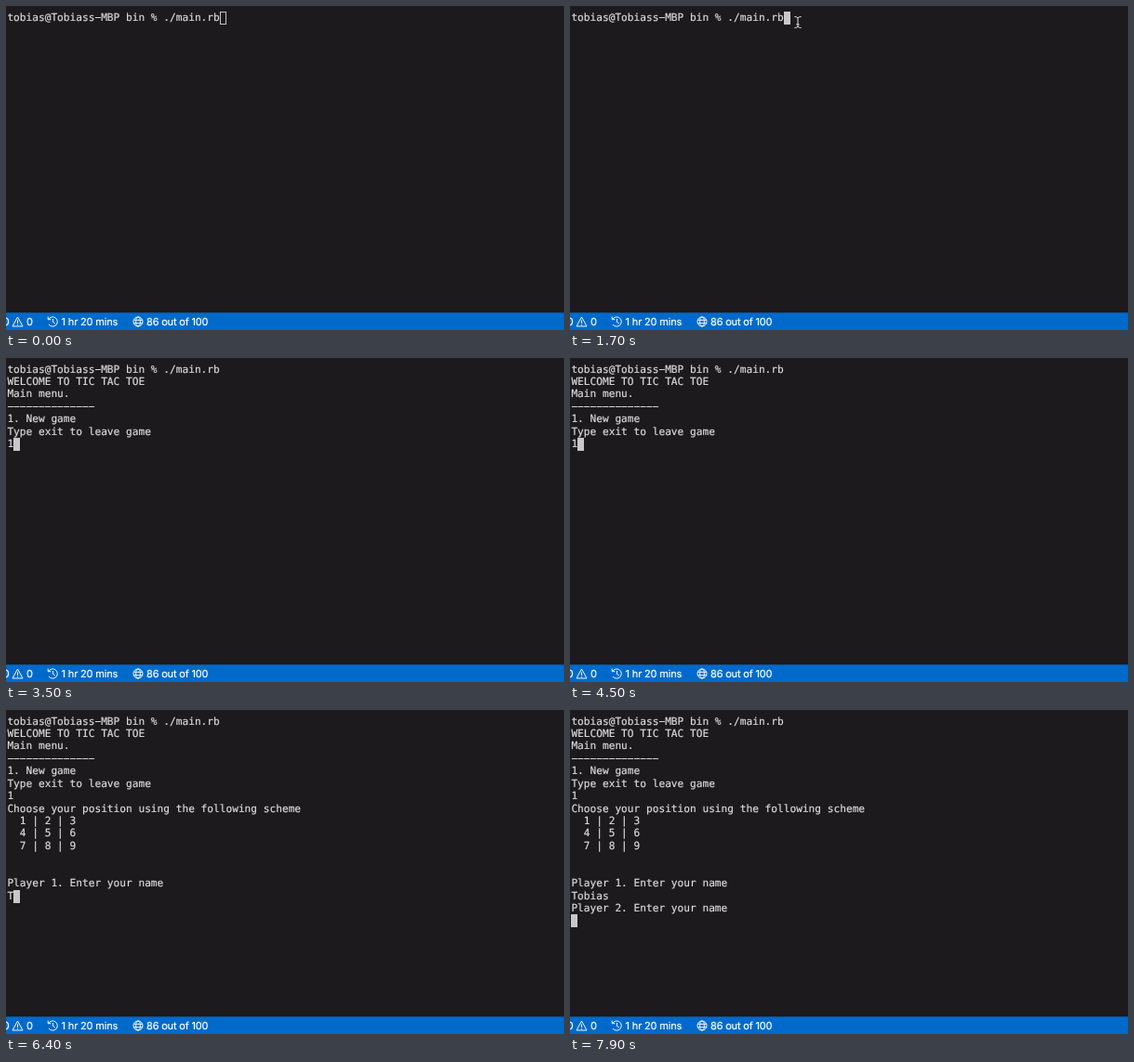
Recreate the animation shown at these times as an HTML page. Size 600 by 349 pixels, loop 8000 ms.

```html
<!DOCTYPE html>
<html lang="en">
<head>
<meta charset="utf-8">
<title>Tic tac toe in the terminal</title>
<style>
  html, body { margin: 0; width: 100%; height: 100%; overflow: hidden; background: #1c1a1c; }
  svg { display: block; width: 600px; height: 349px; }
  text { white-space: pre; text-rendering: geometricPrecision; stroke-width: 0.2; }
  #screen { font: 11.17px "DejaVu Sans Mono", monospace; fill: #dcdadc; stroke: #dcdadc; }
  #cursor { fill: #c9c7c9; stroke: #c9c7c9; stroke-width: 1; }
  #cursor.hollow { fill: none; }
  #pointer { fill: none; stroke: #e2e2e2; stroke-width: 1; }
  #status { font: 11px Inter, sans-serif; letter-spacing: -0.18px; fill: #fff; stroke: #fff; }
  #status .icon { fill: none; stroke-width: 0.95; }
</style>
</head>
<body>
<svg viewBox="0 0 600 349">
  <rect width="600" height="349" fill="#1c1a1c"/>
  <g id="screen"></g>
  <rect id="cursor" width="6" height="13"/>
  <path id="pointer" d="M-3.6-6Q-.8-6 0-4.6Q.8-6 3.6-6M0-4.6V4.6M-3.6 6Q-.8 6 0 4.6Q.8 6 3.6 6M-1.7 2.4H1.7"/>
  <rect y="330.3" width="600" height="19" fill="#006acb"/>
  <g id="status">
    <text x="3.6" y="344" text-anchor="end">0</text>
    <path class="icon" d="M12.5 335L18 345H7ZM12.5 338.3V342M12.5 342.8V343.8" stroke-linejoin="round"/>
    <text x="22" y="344">0</text>
    <path class="icon" d="M45.8 337.4A5.1 5.1 0 1 1 46 343M45.2 334.6V337.7H48.3M50.5 337V340.6L52.8 342"/>
    <text x="59.6" y="344">1 hr 20 mins</text>
    <g class="icon">
      <circle cx="142" cy="340" r="5"/>
      <ellipse cx="142" cy="340" rx="2.3" ry="5"/>
      <path d="M137.4 338.3H146.6M137.4 341.7H146.6"/>
    </g>
    <text x="151" y="344">86 out of 100</text>
  </g>
</svg>
<script>
const LOOP = 8000, LEFT = 1.4, TOP = 5.6, CHAR_W = 6.725, LINE_H = 13.43, BASELINE = 9.95;
const $ = id => document.getElementById(id);
const screen = $("screen"), cursor = $("cursor"), pointer = $("pointer");

// Each event appends to the terminal output.
const output = [
  [0, "tobias@Tobiass\u2212MBP bin % ./main.rb"],
  [2200, "\n"],
  [2400, "WELCOME TO TIC TAC TOE\nMain menu.\n" + "\u2212".repeat(14) +
         "\n1. New game\nType exit to leave game\n"],
  [3400, "1"],
  [4800, "\nChoose your position using the following scheme\n" +
         "  1 | 2 | 3\n  4 | 5 | 6\n  7 | 8 | 9\n\n\nPlayer 1. Enter your name\n"],
  [6400, "T"], [6500, "o"], [6700, "b"], [6800, "i"], [6900, "a"], [7000, "s"],
  [7400, "\nPlayer 2. Enter your name\n"]
];

const FOCUS = 1700, HIDE = 2200;
const pointerPath = [
  [600, 373.5, 145], [900, 330, 98], [1000, 281, 44], [1100, 261.5, 22],
  [1400, 259, 20], [1500, 251, 18], [1600, 245, 17.5]
];

const rows = Array.from({ length: 17 }, (_, i) => {
  const row = document.createElementNS("http://www.w3.org/2000/svg", "text");
  row.setAttribute("x", LEFT);
  row.setAttribute("y", TOP + i * LINE_H + BASELINE);
  return screen.appendChild(row);
});

const set = (el, attrs) => {
  for (const name in attrs) el.setAttribute(name, attrs[name]);
};

function drawTerminal(t) {
  const lines = output.filter(([at]) => at <= t).map(([, s]) => s).join("").split("\n");
  rows.forEach((row, i) => {
    const line = lines[i] || "";
    if (row.textContent !== line) row.textContent = line;
  });
  const last = lines.length - 1;
  // The cursor sits on whole pixels; the half pixel centres its stroke.
  set(cursor, {
    x: Math.round(LEFT + lines[last].length * CHAR_W) + 0.5,
    y: Math.round(TOP + last * LINE_H) + 0.5,
    class: t < FOCUS ? "hollow" : ""
  });
}

function drawPointer(t) {
  const spot = pointerPath.filter(([at]) => at <= t).pop();
  const shown = spot && t < HIDE;
  set(pointer, { visibility: shown ? "visible" : "hidden" });
  if (shown) set(pointer, { transform: `translate(${spot[1]} ${spot[2]})` });
}

const start = performance.now();
function frame() {
  const t = (performance.now() - start) % LOOP;
  drawTerminal(t);
  drawPointer(t);
  requestAnimationFrame(frame);
}
frame();
</script>
</body>
</html>
```
